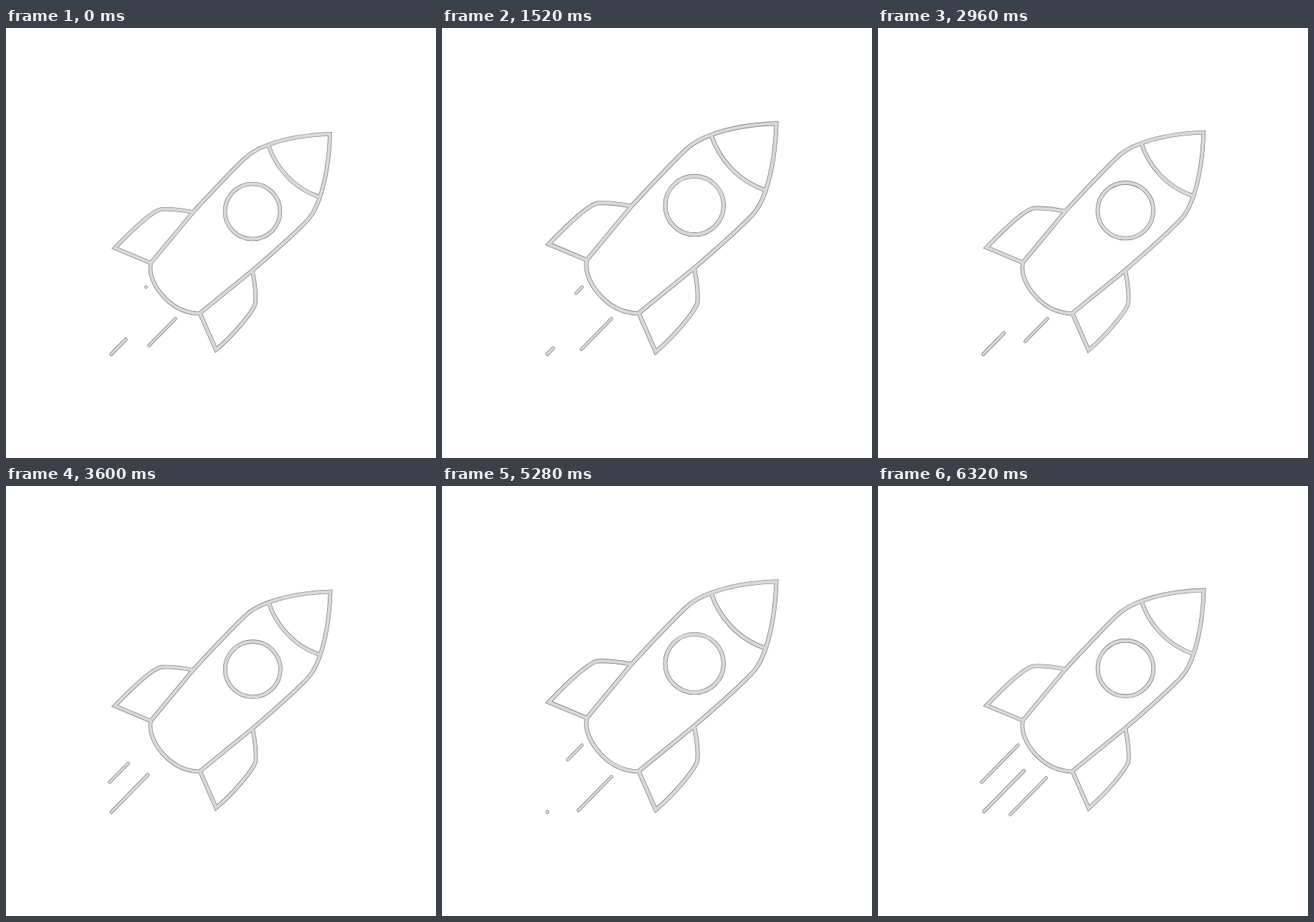
An HTML page with a canvas for the animation above (6.4 s loop, 600 by 600 pixels).

```html
<!DOCTYPE html>
<html lang="en">
<head>
<meta charset="utf-8">
<title>Rocket</title>
<style>
html, body { margin: 0; width: 100%; height: 100%; overflow: hidden; background: #fff; }
canvas { display: block; width: 600px; height: 600px; }
</style>
</head>
<body>
<canvas id="stage" width="600" height="600"></canvas>
<script>
const ctx = document.getElementById('stage').getContext('2d');

const LOOP = 6400, STEP = 80;
const EDGE = '#6c6c6c', FILL = '#d8d8d8', RIM = 0.6;

// Rocket outline at its smallest size
const rocket = new Path2D(`
  M452 148 C420 149 390 154 366 163 C352 168 341 174 332 183
  C308 206 285 231 261 257 L202 328
  C199 344 207 362 223 378 C237 392 253 398 270 398.5
  L343 339 C370 316 393 296 415 274 C428 262 433 250 438 236
  C446 212 451 180 452 148 Z
  M366 163 C376 194 401 224 438 236
  M261 257 C245 254 230 252 216 253 C203 256 175 283 152 307 L202 328
  M344 340 C347 355 349 372 348 384 C345 396 316 430 293 449 L271 399
  M382.5 256 A38.5 38.5 0 1 1 305.5 256 A38.5 38.5 0 1 1 382.5 256 Z`);
const PIVOT = [203, 400], GROWTH = 0.06, PULSE = 3390;

// Exhaust streaks are drawn from the rocket outward, then erased the same way
const PERIOD = 746, DRAW = 322, ERASE_AT = 354, GONE = 705, EARLY = 12;
const streaks = [
  { from: [195.5, 361.5], to: [144.5, 413.5], start: 9, width: 4.4 },
  { from: [203.5, 397.5], to: [147, 455], start: 114, width: 5 },
  { from: [236.5, 405.5], to: [184.5, 458.5], start: -109, width: 4.4 }
];

const clamp = v => Math.min(1, Math.max(0, v));
const mix = (a, b, k) => a.map((v, i) => v + (b[i] - v) * k);
const easeOut = u => 1 - (1 - clamp(u)) ** 3;
const easeIn = u => clamp(u) ** 3;

function outlined(path, width) {
  ctx.strokeStyle = EDGE;
  ctx.lineWidth = width;
  ctx.stroke(path);
  ctx.strokeStyle = FILL;
  ctx.lineWidth = width - 2 * RIM;
  ctx.stroke(path);
}

function drawRocket(t) {
  const scale = 1 + GROWTH * (1 - Math.cos(2 * Math.PI * t / PULSE)) / 2;
  ctx.save();
  ctx.translate(...PIVOT);
  ctx.scale(scale, scale);
  ctx.translate(-PIVOT[0], -PIVOT[1]);
  ctx.lineCap = 'butt';
  ctx.lineJoin = 'miter';
  outlined(rocket, 5.6);
  ctx.restore();
}

function drawStreak({ from, to, start, width }, t) {
  const age = (t - start + EARLY + PERIOD) % PERIOD - EARLY;
  if (age > GONE) return;
  const head = easeOut(age / DRAW);
  const tail = easeIn((age - ERASE_AT) / DRAW);
  const path = new Path2D();
  path.moveTo(...mix(from, to, tail));
  path.lineTo(...mix(from, to, Math.max(head, tail + 0.001)));
  ctx.lineCap = 'round';
  outlined(path, width);
}

function render(now) {
  const t = Math.floor(now % LOOP / STEP) * STEP;
  ctx.fillStyle = '#fff';
  ctx.fillRect(0, 0, 600, 600);
  streaks.forEach(s => drawStreak(s, t));
  drawRocket(t);
}

let origin;
function tick(now) {
  origin ??= now;
  render(now - origin);
  requestAnimationFrame(tick);
}
render(0);
requestAnimationFrame(tick);
</script>
</body>
</html>
```
